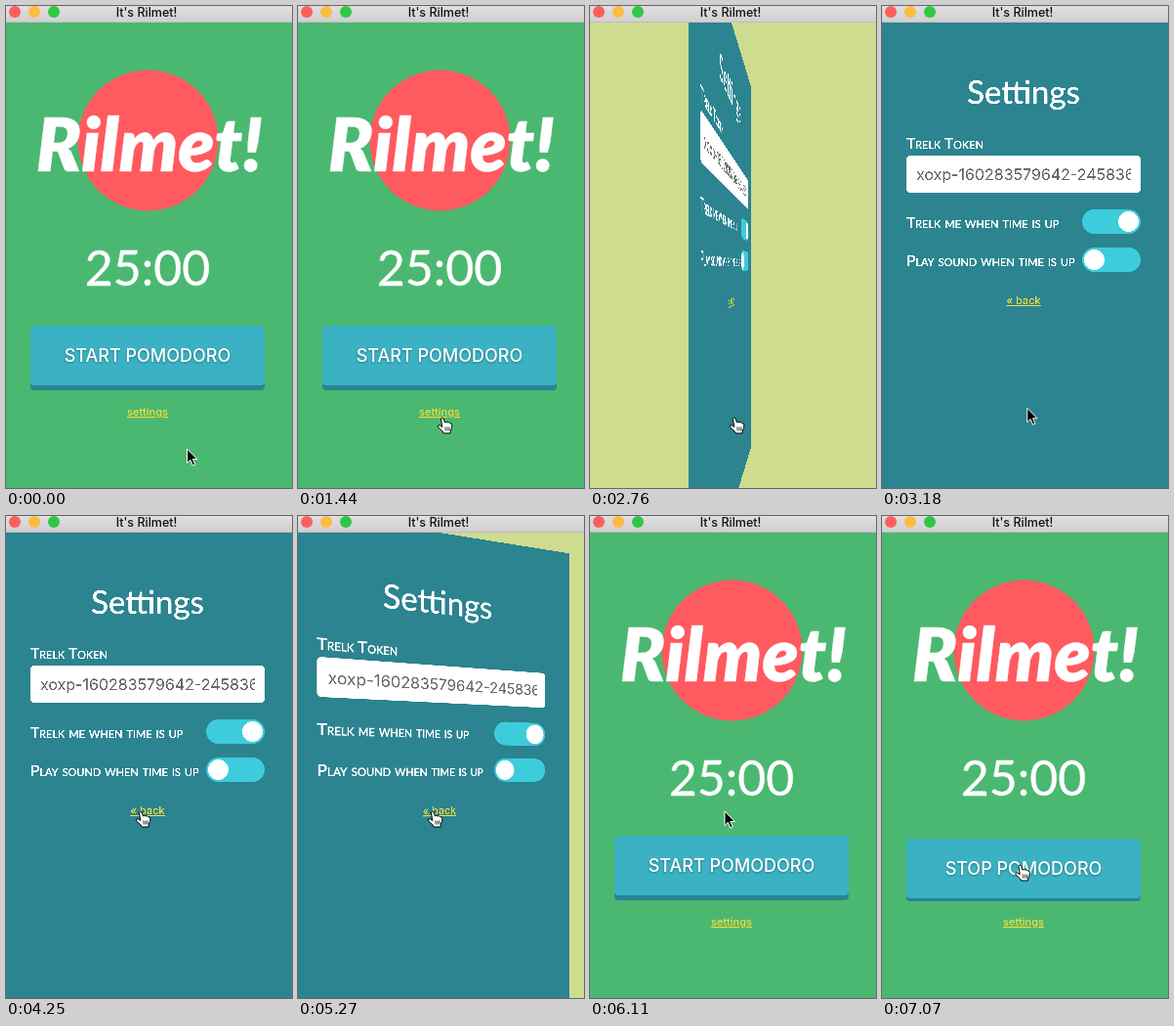
Recreate the animation shown at these times as an HTML page. Size 293x493 px, loop 8 s.

```html
<!DOCTYPE html>
<html lang="en">
<head>
<meta charset="utf-8">
<title>It's Rilmet!</title>
<style>
html, body { margin: 0; width: 100%; height: 100%; overflow: hidden; }
#stage { position: relative; width: 100%; height: 100%; overflow: hidden; contain: strict; background: #cedc8f; }
svg { position: absolute; display: block; }
.page { left: -5px; top: 17px; width: 300px; height: 500px; will-change: transform; font-family: Lato, sans-serif; fill: #fff; }
.page text { stroke: #fff; stroke-width: .4px; }
.page .ui { stroke: none; }
#chrome { left: 0; top: 0; width: 293px; height: 493px; }
.ui { font-family: Inter, sans-serif; }
.mid { text-anchor: middle; }
.link { font-size: 11px; font-weight: 500; fill: #f8dc3a; text-decoration: underline; }
.label { font-size: 15.6px; font-variant: small-caps; }
#label { font-size: 18px; font-weight: 500; filter: drop-shadow(0 1px 1px #0005); }
</style>
</head>
<body>
<div id="stage">
<svg class="page" id="timer" viewBox="-5 17 300 500">
  <rect x="-5" y="17" width="300" height="500" fill="#4bb871"/>
  <circle cx="145.5" cy="137.5" r="72" fill="#ff5a5f"/>
  <text class="mid" x="147" y="169" font-size="76" font-weight="900" font-style="italic">Rilmet!</text>
  <text class="mid" x="145" y="286" font-size="50">25:00</text>
  <rect id="edge" x="25" width="240" height="61" rx="4" fill="#2b8492"/>
  <rect id="face" x="25" width="240" height="61" rx="4" fill="#3ab2c3"/>
  <text class="ui mid" id="label" x="145"></text>
  <text class="ui mid link" x="145" y="419">settings</text>
</svg>

<svg class="page" id="settings" viewBox="-5 17 300 500">
  <rect x="-5" y="17" width="300" height="500" fill="#2b8490"/>
  <text class="mid" x="145" y="100" font-size="33">Settings</text>
  <text class="label" x="25" y="146">Trelk Token</text>
  <rect x="25" y="153" width="240" height="38" rx="4"/>
  <svg x="35" y="153" width="220" height="38">
    <text class="ui" y="25" font-size="16" fill="#666">xoxp-160283579642-245836</text>
  </svg>
  <text class="label" x="25" y="227">Trelk me when time is up</text>
  <text class="label" x="25" y="266">Play sound when time is up</text>
  <g fill="#3cccdc">
    <rect x="205" y="208" width="60" height="25" rx="12.5"/>
    <rect x="205" y="247" width="60" height="25" rx="12.5"/>
  </g>
  <circle cx="252.5" cy="220.5" r="10.5"/>
  <circle cx="217.5" cy="259.5" r="10.5"/>
  <text class="ui mid link" x="145" y="305">« back</text>
</svg>

<svg id="chrome" viewBox="0 0 293 493">
  <linearGradient id="bar" x2="0" y2="1">
    <stop stop-color="#e1dfe1"/><stop offset="1" stop-color="#d0ced0"/>
  </linearGradient>
  <rect width="293" height="17" fill="url(#bar)"/>
  <rect y="16" width="293" height="1" fill="#bdbdbd"/>
  <circle cx="9" cy="6" r="6" fill="#fc605c"/>
  <circle cx="29" cy="6" r="6" fill="#fdbc40"/>
  <circle cx="49" cy="6" r="6" fill="#2fc845"/>
  <text class="ui mid" x="144" y="11" font-size="12.5" font-weight="500" fill="#111">It's Rilmet!</text>
  <g id="cursor">
    <path id="arrow" d="M0 0V14.5L3.4 11.3 5.8 17 8.2 16 5.8 10.5H10.4Z" stroke="#fff"/>
    <g id="hand" stroke="#000" stroke-linejoin="round">
      <path fill="#fff" d="M-1.6 1Q-.3-1 1 .8L2.5 5Q3.7 3.8 5 5 6.5 4 7.4 5.7 9.6 5.2 9.8 7.6 10 11 8.4 13L8 16H1.2L0 14Q-2.6 11.5-4.8 9.4-4.6 7-2.4 8L-.3 9.6Z"/>
      <path stroke-width=".8" d="M2.8 9.5l.5 4M5 9.5l.2 4M7 9.5v4"/>
    </g>
  </g>
</svg>
</div>

<script>
const $ = id => document.getElementById(id);
const LOOP = 8000;
const clamp = p => Math.min(1, Math.max(0, p));
const ease = p => (p = clamp(p), p * p * (3 - 2 * p));

// cursor moves: begin, end, target x, target y
const moves = [
  [0, 120, 203, 467],
  [720, 1440, 148, 421],
  [3120, 3530, 161, 253],
  [3710, 4250, 138, 302],
  [6110, 6530, 141.5, 357]
];

function cursorAt(t) {
  let x = 185.5, y = 453;
  for (const [begin, end, tx, ty] of moves) {
    const p = ease((t - begin) / (end - begin));
    x += (tx - x) * p;
    y += (ty - y) * p;
  }
  return [x, y];
}

// 300 ms flip, advancing in 60 ms ticks
const flip = (t, start, lead) =>
  t < start ? 0 : ease((Math.floor((t - start) / 60) * 60 + lead) / 300);

function drawCard(t) {
  const angle = -180 * (flip(t, 2640, 42) - flip(t, 5270, 52));
  const front = angle > -90;
  const turn = a => `perspective(400px) rotateY(${a}deg)`;
  $('timer').style.display = front ? '' : 'none';
  $('settings').style.display = front ? 'none' : '';
  $('timer').style.transform = turn(angle);
  $('settings').style.transform = turn(angle + 180);
}

function drawButton(hover, press, running) {
  const shift = press ? 5 : hover ? 3 : 0;
  const depth = press ? 0 : hover ? 3 : 5;
  $('face').setAttribute('y', 327 + shift);
  $('edge').setAttribute('y', 327 + shift + depth);
  $('label').setAttribute('y', 364 + shift);
  $('label').textContent = running ? 'STOP POMODORO' : 'START POMODORO';
}

function draw(t) {
  const [x, y] = cursorAt(t);
  const hover = t > 6110 && y > 328;
  const hand = hover || (t >= 1320 && t < 3180) || (t >= 4130 && t < 6110);
  drawCard(t);
  drawButton(hover, t >= 6830 && t < 7070, t >= 7070);
  $('cursor').setAttribute('transform', `translate(${x} ${y})`);
  $('arrow').style.display = hand ? 'none' : '';
  $('hand').style.display = hand ? '' : 'none';
}

let began;
function tick(now) {
  began ??= now;
  draw((now - began) % LOOP);
  requestAnimationFrame(tick);
}
draw(0);
requestAnimationFrame(tick);
</script>
</body>
</html>
```
